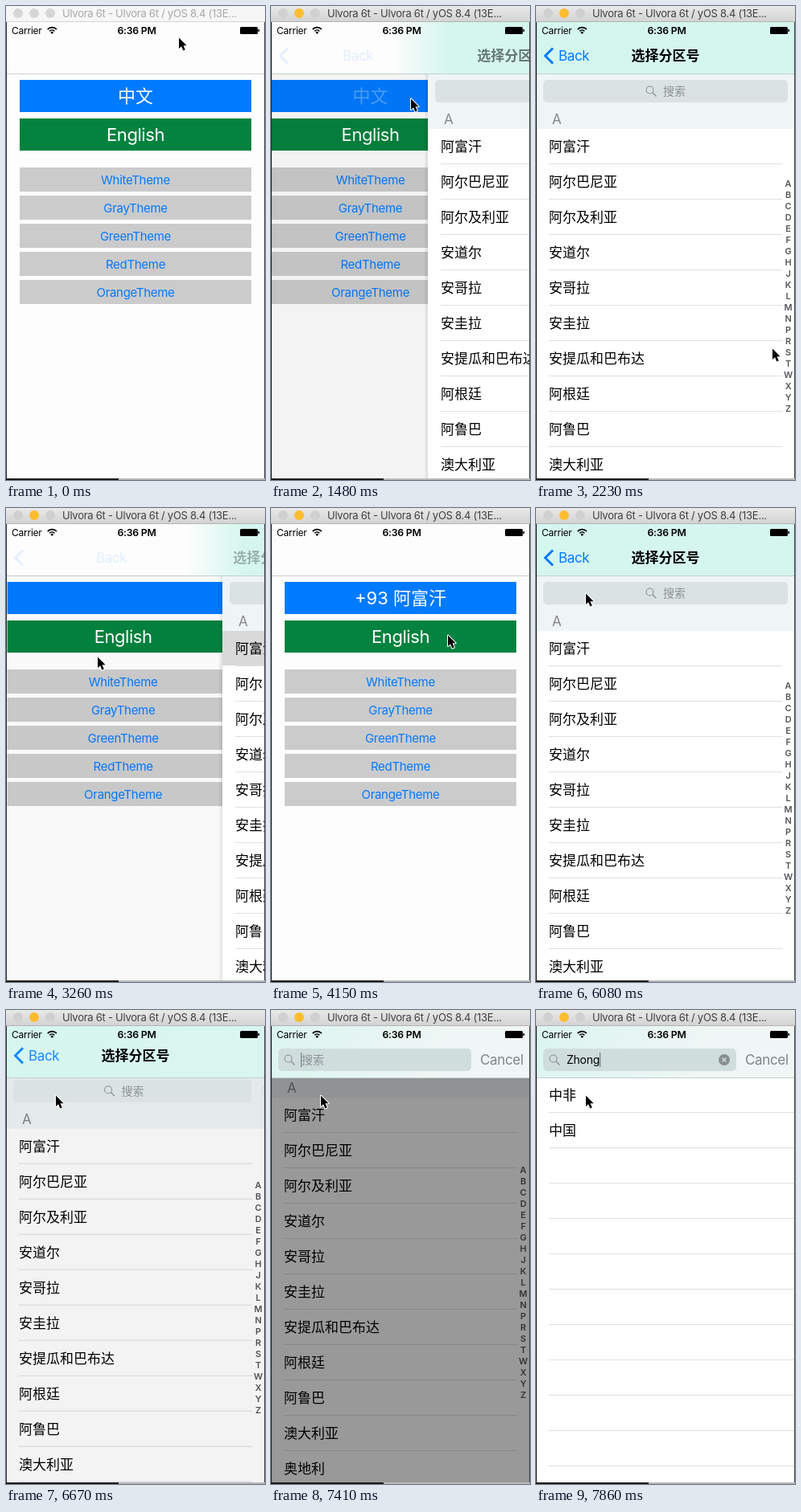
These frames come from a looping animation (322x590 px, 8 s). An HTML page with a canvas:

```html
<!DOCTYPE html>
<html lang="zh">
<head>
<meta charset="utf-8">
<title>Region picker</title>
<style>
html, body { margin: 0; height: 100%; overflow: hidden; background: #fff; }
canvas { display: block; width: 322px; height: 590px; }
</style>
</head>
<body>
<canvas id="stage"></canvas>
<script>
const W = 322, H = 590, LOOP = 8000, STEP = 148.3;
const canvas = document.getElementById('stage');
const g = canvas.getContext('2d');
const dpr = window.devicePixelRatio || 1;
canvas.width = W * dpr;
canvas.height = H * dpr;

const BLUE = '#007aff';
const themes = ['White', 'Gray', 'Green', 'Red', 'Orange'];
const countries = ['阿富汗', '阿尔巴尼亚', '阿尔及利亚', '安道尔', '安哥拉', '安圭拉',
  '安提瓜和巴布达', '阿根廷', '阿鲁巴', '澳大利亚', '奥地利'];
const letters = 'ABCDEFGHJKLMNPRSTWXYZ';

// Progress by step since a transition began
const slide = [0.39, 0.84, 0.97, 1];
const rise = [0.12, 0.6, 0.93, 1];
const typed = ['Z', 'Zho', 'Zhong'];

// Pointer keys: step, x, y
const pointer = [[2, 215, 40], [7, 174, 116], [12, 174, 116], [15, 294, 427], [17, 105, 229],
  [19, 114, 186], [23, 114, 186], [28, 220, 159], [31, 220, 159], [34, 171, 121],
  [38, 171, 121], [41, 62, 107], [54, 62, 107]];

const mix = (a, b, p) => a + (b - a) * p;
const at = (curve, i) => i < 0 ? 0 : curve[Math.min(i, curve.length - 1)];

function rect(x, y, w, h, color) {
  g.fillStyle = color;
  g.fillRect(x, y, w, h);
}

function pill(x, y, w, h, r, color) {
  g.fillStyle = color;
  g.beginPath();
  g.roundRect(x, y, w, h, r);
  g.fill();
}

function disc(x, y, r, color) {
  g.fillStyle = color;
  g.beginPath();
  g.arc(x, y, r, 0, 7);
  g.fill();
}

function line(points, color, width) {
  g.strokeStyle = color;
  g.lineWidth = width;
  g.beginPath();
  points.forEach(([x, y]) => g.lineTo(x, y));
  g.stroke();
}

function gradient(x0, y0, x1, y1, ...colors) {
  const fill = g.createLinearGradient(x0, y0, x1, y1);
  colors.forEach((c, i) => fill.addColorStop(i / (colors.length - 1), c));
  return fill;
}

// y is the visual middle of the capitals
function text(s, x, y, size, color, align = 'left', weight = 400) {
  const cjk = /[\u4e00-\u9fff]/.test(s);
  g.font = `${weight} ${size}px Inter, "Noto Sans CJK SC", "Noto Sans CJK", sans-serif`;
  g.letterSpacing = cjk ? '0px' : `${-0.02 * size}px`;
  g.textAlign = align;
  g.textBaseline = 'alphabetic';
  g.fillStyle = color;
  g.fillText(s, x, y + size * 0.365);
}

function faded(alpha, draw) {
  g.save();
  g.globalAlpha *= Math.max(0, Math.min(1, alpha));
  draw();
  g.restore();
}

function magnifier(x, y, color) {
  g.strokeStyle = color;
  g.lineWidth = 1.1;
  g.beginPath();
  g.arc(x - 1.5, y - 1.5, 4.5, 0, 7);
  g.stroke();
  line([[x + 1.8, y + 1.8], [x + 6.5, y + 6.5]], color, 1.3);
}

function titleBar(active) {
  rect(0, 0, W, 20, active ? gradient(0, 0, 0, 20, '#e9e9e9', '#d2d2d2') : '#f6f6f6');
  rect(0, 19, W, 1, active ? '#b4b4b4' : '#d4d4d4');
  [15, 35, 55].forEach((x, i) =>
    disc(x, 9, 6, active ? (i === 1 ? '#fdbd2e' : '#d0d0d0') : '#d6d6d6'));
  text('Ulvora 6t - Ulvora 6t / yOS 8.4 (13E...', 70, 9.5, 13, active ? '#404040' : '#a8a8a8');
}

function statusBar() {
  text('Carrier', 7, 30.5, 12, '#000');
  g.strokeStyle = '#000';
  g.lineWidth = 1.6;
  [4, 7.4].forEach(r => {
    g.beginPath();
    g.arc(57.3, 34, r, -Math.PI * 0.77, -Math.PI * 0.23);
    g.stroke();
  });
  disc(57.3, 33.2, 1.4, '#000');
  text('6:36 PM', 162.5, 30.5, 12.3, '#000', 'center', 600);
  pill(291, 26, 22, 9, 1.5, '#000');
  rect(313.5, 29, 1.5, 3, '#000');
}

function mainPage(dx, label, alpha) {
  rect(0, 20, W, H, '#fdfdfd');
  rect(17 + dx, 92, 288, 40, BLUE);
  faded(alpha, () => text(label, 161 + dx, 112, 22, '#fff', 'center'));
  rect(17 + dx, 140, 288, 40, '#04823f');
  text('English', 161 + dx, 160, 22, '#fff', 'center');
  themes.forEach((name, i) => {
    rect(17 + dx, 201 + 35 * i, 288, 30, '#cbcbcb');
    text(name + 'Theme', 161 + dx, 216.5 + 35 * i, 15, BLUE, 'center');
  });
}

function listPage(x, search, selected) {
  const up = 44 * search;
  rect(x, 84, W, H, '#fff');
  rect(x, 84, W, 69 - up, '#eff5f4');
  text('A', x + 20, 141 - up, 17, '#85858a');
  countries.forEach((name, i) => {
    const top = 153 + 44 * i - up;
    if (selected && i === 0) rect(x, top, W, 43, '#d9d9d9');
    text(name, x + 16, top + 22, 17, '#000');
    rect(x + 16, top + 43, 290, 1, '#e0e0e2');
  });
  [...letters].forEach((c, i) =>
    text(c, x + 313.5, 220.5 + 14 * i - up / 2, 11, '#55555b', 'center', 600));
  if (search) rect(x, 84, W, H, `rgba(0,0,0,${0.4 * search})`);
}

function results() {
  rect(0, 84, W, H, '#fff');
  ['中非', '中国'].forEach((name, i) => text(name, 16, 106 + 44 * i, 17, '#000'));
  for (let y = 127; y < 588; y += 44) rect(16, y, 305, 1, '#e0e0e2');
}

function navBar(x, shown, search, reach) {
  rect(0, 20, W, 64, '#fdfdfd');
  if (shown === 1) rect(0, 20, W, 64, '#d5f6ee');
  else if (shown) rect(0, 20, W, 64, gradient(x - 45, 0, x + 25, 0, 'rgba(213,246,238,0)', '#d5f6ee'));
  if (search) faded(search, () =>
    rect(0, 20, W, 64, gradient(0, 20, 200, 100, '#dbf5ef', '#f0f6f5')));
  if (shown) {
    g.save();
    g.beginPath();
    g.rect(0, 20, W, 64);
    g.clip();
    const y = 62 - 44 * search, rest = 1 - shown;
    faded(Math.max(0.1, shown * 2 - 1) * (1 - search), () => {
      line([[21, y - 9.5], [11.5, y], [21, y + 9.5]], BLUE, 3);
      text('Back', 28 + 100 * rest, y, 17, BLUE);
    });
    faded((shown + 0.13) * (1 - search), () =>
      text('选择分区号', 161 + reach * rest, y, 17, '#000', 'center', 600));
    g.restore();
  }
  rect(0, 84, W, 1, shown ? '#c2cfcc' : '#cfcfcf');
}

function searchBar(x, search, query, caret) {
  const y = 106 - 44 * search, ink = '#8b9194';
  pill(x + 9, y - 14, mix(304, 240, search), 28, 5, search > 0.5 ? '#cfdddd' : '#dbe2e3');
  magnifier(x + mix(143, 23, search), y, ink);
  const left = x + mix(158, 38, search);
  if (query) text(query, left, y, 14, '#000');
  else text('搜索', left, y, 14, ink);
  if (caret) {
    const end = query ? left + g.measureText(query).width + 0.5 : 37;
    rect(Math.round(end), y - 9, 1.2, 18, '#6d8482');
  }
  if (query) {
    disc(234, y, 7, '#87908f');
    line([[231.5, y - 2.5], [236.5, y + 2.5]], '#d5e1e0', 1.3);
    line([[236.5, y - 2.5], [231.5, y + 2.5]], '#d5e1e0', 1.3);
  }
  if (search) faded(search, () => text('Cancel', mix(324, 260, search), y, 17, '#7f8687'));
}

function arrow(k) {
  const n = pointer.findIndex(p => p[0] > k);
  let [, x, y] = pointer[Math.max(0, n - 1)];
  if (n > 0) {
    const [k0] = pointer[n - 1], [k1, x1, y1] = pointer[n];
    const p = (k - k0) / (k1 - k0);
    x = mix(x, x1, p);
    y = mix(y, y1, p);
  }
  g.save();
  g.translate(x, y - 0.5);
  const shape = new Path2D('M0 0V13.5L3.1 10.7 5.3 16 7.8 15 5.5 9.7H9.6Z');
  g.lineJoin = 'round';
  g.strokeStyle = '#fff';
  g.lineWidth = 2;
  g.stroke(shape);
  g.fillStyle = '#000';
  g.fill(shape);
  g.restore();
}

function draw(t) {
  const k = Math.floor((t + 6) / STEP);
  const popping = k >= 21 && k < 36;
  const shown = k >= 36 ? at(slide, k - 36) : popping ? 1 - at(slide, k - 21) : at(slide, k - 10);
  const search = at(rise, k - 45);
  const query = k > 50 ? typed[k - 51] : '';
  const x = Math.round(320 * (1 - shown));
  const pressed = k >= 36 || (k >= 10 && k < 21);
  const labelAlpha = pressed ? 0.3 : k === 21 || k === 22 ? 0 : 1;

  g.setTransform(dpr, 0, 0, dpr, 0, 0);
  if (shown < 1) mainPage(-96 * shown, k < 21 ? '中文' : '+93 阿富汗', labelAlpha);
  if (shown) {
    if (shown < 1) {
      rect(0, 84, x, H, `rgba(0,0,0,${0.1 * shown})`);
      rect(x - 5, 84, 5, H, gradient(x - 5, 0, x, 0, 'rgba(0,0,0,0)', 'rgba(0,0,0,.1)'));
    }
    if (query) results();
    else listPage(x, search, popping);
  }
  navBar(x, shown, search, popping ? 195 : 226);
  if (shown) searchBar(x, search, query, k >= 50);
  statusBar();
  titleBar(k >= 10);
  rect(0, 20, 1, H, '#2a2a2a');
  rect(321, 20, 1, H, '#4a4a4a');
  rect(0, 588, 140, 2, '#1c1a1d');
  rect(140, 588, 182, 2, '#b9b9bd');
  arrow(k);
}

const start = performance.now();
function tick() {
  draw((performance.now() - start) % LOOP);
  requestAnimationFrame(tick);
}
tick();
</script>
</body>
</html>
```
